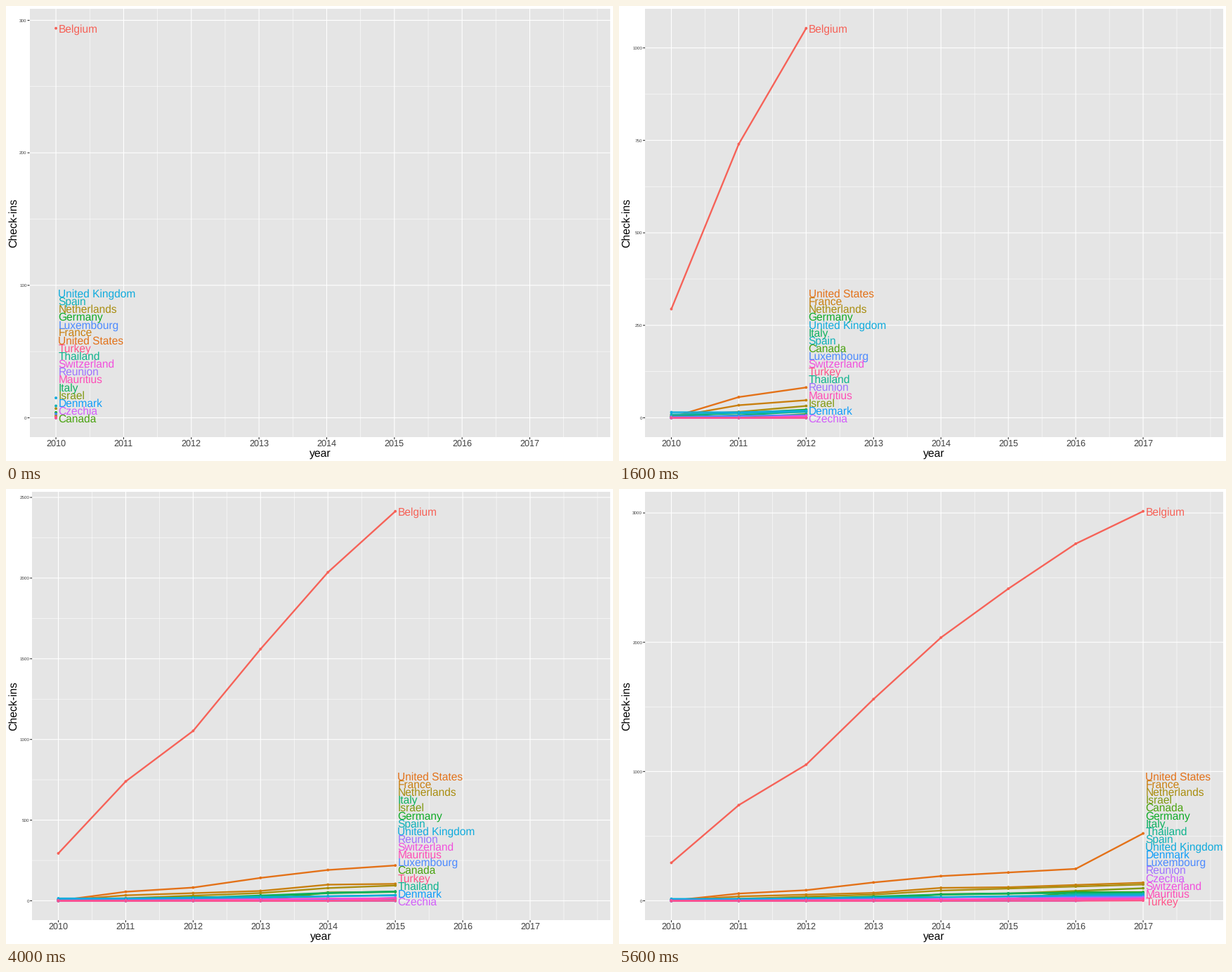
A matplotlib script for the animation above (6400 ms loop, 864 by 648 pixels).

```python
import numpy as np
import matplotlib.pyplot as plt
from matplotlib.animation import FuncAnimation
from matplotlib.patches import Circle, Rectangle

plt.rcParams["font.family"] = "Liberation Sans"
plt.rcParams["text.hinting"] = "none"

W, H = 864, 648
TOP, BOTTOM, RIGHT = 4, 614.2, 860.2
PAD = (BOTTOM - TOP) / 22
BASE, PEAK = BOTTOM - PAD, TOP + PAD
FIRST, YEARS, SPAN = 2010, 8, 7.8
CAP = 0.716  # cap height relative to font size
GREY, DARK = "#404040", "#2A2A2A"

# Key points {year index: running total}; straight lines run between them.
KEYS = {
    "Belgium": {0: 294, 1: 740, 2: 1053, 3: 1560, 4: 2036, 5: 2414, 6: 2762,
                7: 3013},
    "United States": {0: 1, 1: 56, 2: 82, 3: 142, 4: 191, 6: 247, 7: 521},
    "France": {0: 2, 1: 34, 3: 61, 4: 100, 5: 105, 7: 140},
    "Netherlands": {0: 7, 1: 16, 3: 48, 4: 79, 7: 126},
    "Israel": {4: 52, 5: 56, 7: 97},
    "Canada": {2: 10, 5: 12, 6: 67},
    "Germany": {0: 4, 2: 22, 3: 26, 4: 47, 6: 64},
    "Italy": {1: 7, 2: 17, 4: 49, 5: 58, 7: 62},
    "Thailand": {6: 54},
    "Spain": {0: 9, 3: 19, 7: 52},
    "United Kingdom": {0: 15, 1: 15, 7: 42},
    "Denmark": {7: 36},
    "Luxembourg": {0: 3, 5: 14, 6: 30, 7: 32},
    "Reunion": {5: 20, 7: 28},
    "Czechia": {7: 22},
    "Switzerland": {2: 5, 4: 14, 7: 18},
    "Mauritius": {5: 15},
    "Turkey": {7: 2},
}


def running_total(keys):
    """Totals for every year, zero until the year before the first key."""
    start = min(keys) - 1
    return np.interp(range(YEARS), [start, *keys], [0, *keys.values()])


def hue_color(degrees, light=65, chroma=100):
    """Polar LUV colour as RGB, darkened by a steeper display gamma."""
    h = np.radians(degrees)
    u = chroma * np.cos(h) / (13 * light) + 0.1978
    v = chroma * np.sin(h) / (13 * light) + 0.4683
    y = ((light + 16) / 116) ** 3
    xyz = [y * 9 * u / (4 * v), y, y * (12 - 3 * u - 20 * v) / (4 * v)]
    to_rgb = [[3.2405, -1.5371, -0.4985],
              [-0.9693, 1.8760, 0.0416],
              [0.0556, -0.2040, 1.0572]]
    linear = np.clip(np.dot(to_rgb, xyz), 0.0031, 1)
    srgb = 1.055 * linear ** (1 / 2.4) - 0.055
    return tuple(np.clip(srgb ** 1.25, 0.06, 1))


TOTALS = {name: running_total(keys) for name, keys in KEYS.items()}
COLORS = {name: hue_color(15 + 360 * i / len(KEYS))
          for i, name in enumerate(KEYS)}

fig = plt.figure(figsize=(W / 72, H / 72), dpi=72, facecolor="white")
ax = fig.add_axes([0, 0, 1, 1])


def line(xs, ys, color, width, z=1):
    ax.plot(xs, ys, color=color, lw=width, zorder=z, snap=False,
            solid_capstyle="butt", solid_joinstyle="round")


def text(x, y, s, size, color="black", ha="left", **kw):
    ax.text(x, y, s, fontsize=size, color=color, ha=ha, va="baseline", **kw)


def nice_step(top):
    """Smallest round step that leaves fewer than five gaps."""
    steps = (m * 10 ** e for e in (1, 2, 3) for m in (1, 2, 2.5, 5))
    return int(next(s for s in steps if top / s < 5))


def label_rows(k):
    """Centre height of every end label, stacked upwards by total."""
    names = sorted((n for n in TOTALS if n != "Belgium"),
                   key=lambda n: (TOTALS[n][k], n))
    rows = {n: 587.2 - 11.13 * i for i, n in enumerate(names)}
    rows["Belgium"] = PEAK + 0.1
    return rows


def draw_axes(left, x_at, y_at, step):
    ax.add_patch(Rectangle((left, TOP), RIGHT - left, BOTTOM - TOP,
                           fc="#E5E5E5", lw=0, zorder=0))

    for half in range(2 * YEARS + 1):
        year = FIRST + half / 2
        x = x_at(year)
        major = half % 2 == 0 and half < 2 * YEARS
        line([x, x], [TOP, BOTTOM], "white", 1.1 if major else 0.55)
        if major:
            line([x, x], [BOTTOM, BOTTOM + 2.9], DARK, 1.1)
            text(x, 627.2, f"{year:.0f}", 12.6, GREY, "center")

    half = 0
    while (y := y_at(half * step / 2)) > TOP:
        major = half % 2 == 0
        line([left, RIGHT], [y, y], "white", 1.1 if major else 0.55)
        if major:
            line([left - 2.9, left], [y, y], DARK, 1.1)
            text(left - 3.9, y + CAP * 3.15, str(half * step // 2), 6.3,
                 GREY, "right")
        half += 1

    text((left + RIGHT) / 2, 641.7, "year", 15.8, ha="center")
    text(15.4, (TOP + BOTTOM) / 2, "Check-ins", 15.8, ha="center",
         rotation=90, rotation_mode="anchor")


def draw(k):
    ax.clear()
    ax.set(xlim=(0, W), ylim=(H, 0))
    ax.axis("off")

    top = TOTALS["Belgium"][k]
    step = nice_step(top)
    left = 33.5 if top < 1000 else 37.1  # room for the widest tick label
    width = RIGHT - left

    def x_at(year):
        return left + width / 22 + (year - FIRST) * width / 1.1 / SPAN

    def y_at(value):
        return BASE - value * (BASE - PEAK) / top

    draw_axes(left, x_at, y_at, step)
    xs = x_at(FIRST + np.arange(k + 1))
    rows = label_rows(k)
    for i, (name, totals) in enumerate(TOTALS.items()):
        color, z = COLORS[name], i / 100
        ys = y_at(totals[:k + 1])
        line(xs, ys, color, 2.35, 2 + z)
        for point in zip(xs, ys):
            ax.add_patch(Circle(point, 1.95, fc=color, lw=0, zorder=3 + z))
        text(xs[-1] + 3.3, rows[name] + CAP * 7.75, name, 15.5, color,
             zorder=4 + z)
    return []


anim = FuncAnimation(fig, draw, frames=YEARS, interval=800,
                     init_func=lambda: [], repeat=True, repeat_delay=0,
                     blit=False)
plt.show()
```
